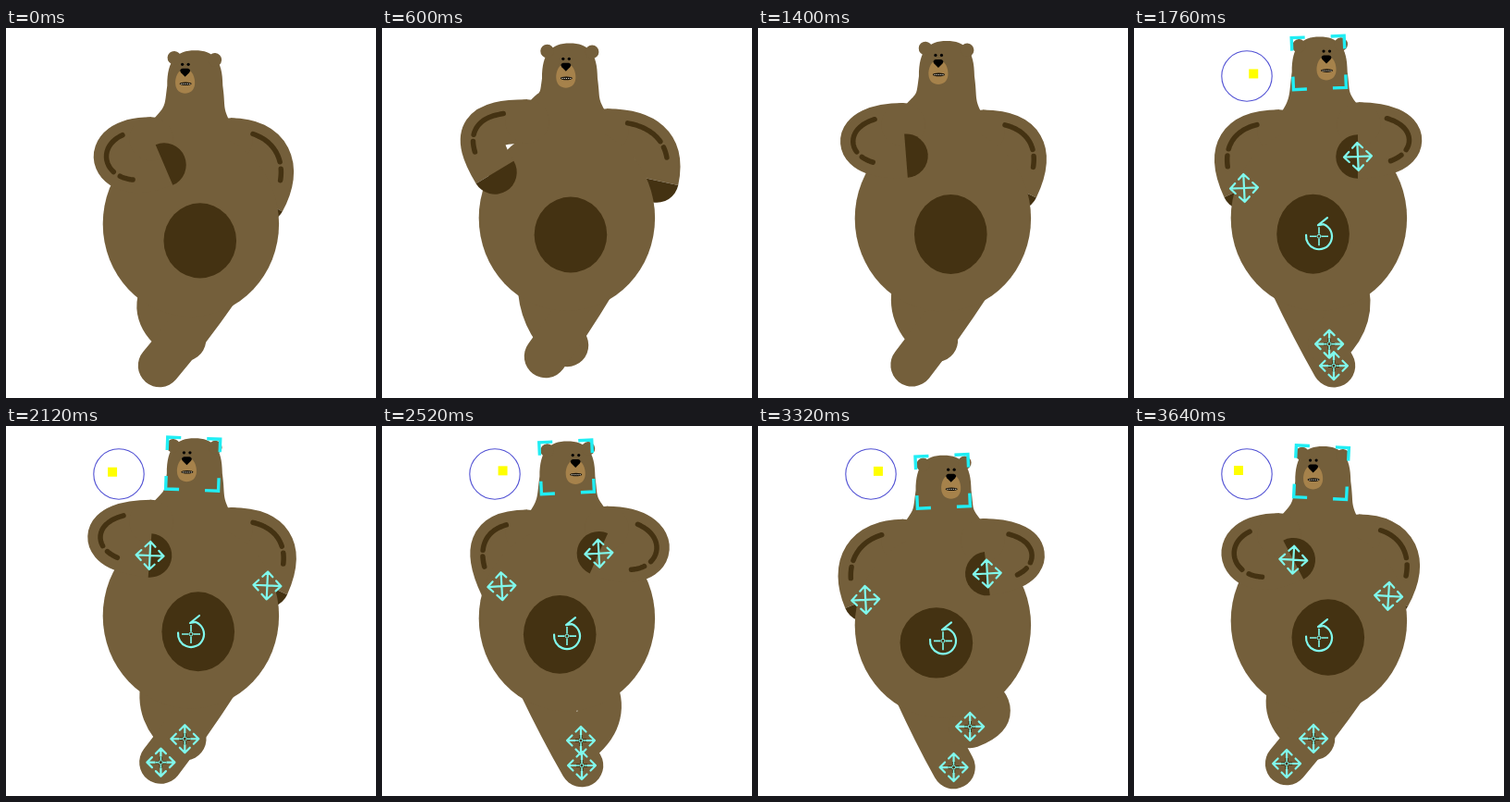
An HTML page with a canvas for the animation above (3.68 s loop, 400 by 400 pixels).

```html
<!DOCTYPE html>
<html lang="en">
<head>
<meta charset="utf-8">
<title>Strutting bear</title>
<style>
  html, body { margin: 0; width: 100%; height: 100%; overflow: hidden; background: #fff; }
  canvas { display: block; width: 400px; height: 400px; }
</style>
</head>
<body>
<canvas id="stage" width="400" height="400"></canvas>
<script>
const ctx = document.getElementById('stage').getContext('2d');
const LOOP = 3680, STEP = 40, CYCLE = 730, RIG_START = 1720;
const FUR = '#745f3b', DARK = '#443212', MUZZLE = '#a6824b';
const RIG = '#80f8ec', FRAME = '#20eef4';
const TAU = Math.PI * 2, LIMB = 47.5, SHOULDER_X = 157, WIDTH = 400;

// phase, hand x, hand y, hand angle, shoulder y, bend length
const ARM = [
  [0, 171, 148, -23, 120, 62],
  [120, 104, 182, 80, 128, 38],
  [235, 103, 165, 78, 111, 40],
  [300, 119, 173, 65, 112, 44],
  [335, 130, 174, 64, 115, 42],
  [365, 122, 187, 61, 121, 42],
  [485, 107, 182, 81, 128, 38],
  [600, 122, 156, 59, 101, 50],
  [665, 158, 139, 0, 104, 60],
  [697, 166, 138, -25, 111, 67]
];
// phase, foot x, foot y
const LEFT_FOOT = [
  [0, 193, 337], [120, 163, 313], [235, 208, 355], [330, 216, 367],
  [485, 204, 366], [600, 200, 343], [665, 193, 338]
];
const RIGHT_FOOT = [
  [0, 166, 365], [120, 189, 365], [235, 203, 343], [330, 215, 340],
  [485, 236, 313], [600, 177, 355], [665, 167, 364]
];

const wrap = (v, n) => ((v % n) + n) % n;

// Periodic cubic interpolation through a list of keys
function sample(keys, phase) {
  const n = keys.length;
  const p = wrap(phase, CYCLE);
  let i = n - 1;
  while (keys[i][0] > p) i--;
  const at = k => ({ v: keys[wrap(k, n)], t: keys[wrap(k, n)][0] + Math.floor(k / n) * CYCLE });
  const [a, b, c, d] = [at(i - 1), at(i), at(i + 1), at(i + 2)];
  const span = c.t - b.t, u = (p - b.t) / span, u2 = u * u, u3 = u2 * u;
  return b.v.slice(1).map((_, j) => {
    const k = j + 1;
    const m0 = (c.v[k] - a.v[k]) / (c.t - a.t) * span;
    const m1 = (d.v[k] - b.v[k]) / (d.t - b.t) * span;
    return (2 * u3 - 3 * u2 + 1) * b.v[k] + (u3 - 2 * u2 + u) * m0 +
           (3 * u2 - 2 * u3) * c.v[k] + (u3 - u2) * m1;
  });
}

// Two bounces per stride; -1 at the top of the bounce
const bounce = (phase, top) => -Math.cos(TAU * (phase - top) / (CYCLE / 2));

function local(x, y, angle, draw) {
  ctx.save();
  ctx.translate(x, y);
  ctx.rotate(angle);
  draw();
  ctx.restore();
}

function mirrored(flip, draw) {
  ctx.save();
  if (flip) {
    ctx.translate(WIDTH, 0);
    ctx.scale(-1, 1);
  }
  draw();
  ctx.restore();
}

function ellipse(x, y, rx, ry, color) {
  ctx.fillStyle = color;
  ctx.beginPath();
  ctx.ellipse(x, y, rx, ry, 0, 0, TAU);
  ctx.fill();
}

function stroke(color, width, cap = 'round') {
  ctx.strokeStyle = color;
  ctx.lineWidth = width;
  ctx.lineCap = cap;
  ctx.lineJoin = cap === 'round' ? 'round' : 'miter';
  ctx.stroke();
}

function polyline(...points) {
  points.forEach(([x, y], i) => i ? ctx.lineTo(x, y) : ctx.moveTo(x, y));
}

function armPose(phase) {
  const [x, y, degrees, shoulder, bend] = sample(ARM, phase);
  const angle = degrees * Math.PI / 180;
  const p = wrap(phase, CYCLE);
  return {
    x, y, angle, shoulder,
    front: p < 180 || p > 540,
    curve: [[SHOULDER_X, shoulder], [SHOULDER_X - bend, shoulder],
            [x - bend * Math.cos(angle), y - bend * Math.sin(angle)], [x, y]]
  };
}

// Point beside a cubic, at a signed distance
function offsetPoint(curve, t, distance) {
  const s = 1 - t;
  const [a, b, c, d] = curve;
  const pos = k => s * s * s * a[k] + 3 * s * s * t * b[k] + 3 * s * t * t * c[k] + t * t * t * d[k];
  const vel = k => s * s * (b[k] - a[k]) + 2 * s * t * (c[k] - b[k]) + t * t * (d[k] - c[k]);
  const vx = vel(0), vy = vel(1), len = Math.hypot(vx, vy) || 1;
  return [pos(0) + vy / len * distance, pos(1) - vx / len * distance];
}

function drawArm(arm) {
  const [a, b, c, d] = arm.curve;
  ctx.beginPath();
  ctx.moveTo(...a);
  ctx.bezierCurveTo(...b, ...c, ...d);
  stroke(FUR, LIMB, 'butt');
  ellipse(a[0], a[1], LIMB / 2, LIMB / 2, FUR);
  local(arm.x, arm.y, arm.angle, () => {
    ctx.fillStyle = DARK;
    ctx.beginPath();
    ctx.arc(0, 0, LIMB / 2, -Math.PI / 2, Math.PI / 2);
    ctx.fill();
  });
}

function drawArmShine({ curve }) {
  for (const [from, to] of [[0.19, 0.59], [0.66, 0.77]]) {
    const points = [];
    for (let i = 0; i <= 16; i++) {
      points.push(offsetPoint(curve, from + (to - from) * i / 16, -10));
    }
    ctx.beginPath();
    polyline(...points);
    stroke(DARK, 5.5);
  }
}

function drawLeg(hipX, hipY, [x, y], side) {
  const slack = Math.max(0, 88 - Math.hypot(x - hipX, y - hipY));
  const bulge = Math.min(41, slack);
  ctx.beginPath();
  ctx.moveTo(hipX, hipY);
  ctx.quadraticCurveTo((hipX + x) / 2 + side * bulge, (hipY + y) / 2 + 4, x, y);
  ctx.fillStyle = FUR;
  ctx.fill();
  stroke(FUR, LIMB - 1);
}

function drawHead({ x, top, tilt, swing }, leftY, rightY) {
  const l = leftY - 22, r = rightY - 22;
  ctx.fillStyle = FUR;
  ctx.beginPath();
  ctx.moveTo(160, l);
  ctx.bezierCurveTo(x - 31, l - 14, x - 33, top + 60, x - 30, top + 38);
  ctx.bezierCurveTo(x - 30, top + 10, x - 20, top, x, top);
  ctx.bezierCurveTo(x + 20, top, x + 30, top + 10, x + 30, top + 38);
  ctx.bezierCurveTo(x + 33, top + 60, x + 30, r - 14, 241, r);
  ctx.lineTo(241, 165);
  ctx.lineTo(160, 165);
  ctx.fill();

  const ear = 25.5 - 3.5 * Math.abs(swing);
  local(x, top, tilt, () => {
    ellipse(-ear, 9, 7.3, 7.3, FUR);
    ellipse(ear, 9, 7.3, 7.3, FUR);
  });
}

function drawFace({ x, top, swing }) {
  const drop = 3 * (1 - Math.abs(swing));
  local(x - 0.7 - 10 * swing, top + drop, 0, () => {
    ctx.fillStyle = MUZZLE;
    ctx.beginPath();
    ctx.moveTo(0, 20);
    ctx.bezierCurveTo(8, 20, 11, 30, 10.5, 36);
    ctx.bezierCurveTo(10, 50, -10, 50, -10.5, 36);
    ctx.bezierCurveTo(-11, 30, -8, 20, 0, 20);
    ctx.fill();

    ellipse(-3, 15, 1.6, 1.6, '#000');
    ellipse(3.5, 15, 1.6, 1.6, '#000');

    ctx.fillStyle = '#000';
    ctx.beginPath();
    ctx.moveTo(-3, 19.5);
    ctx.lineTo(3, 19.5);
    ctx.quadraticCurveTo(7, 21, 4.5, 24);
    ctx.lineTo(0, 28.5);
    ctx.lineTo(-4.5, 24);
    ctx.quadraticCurveTo(-7, 21, -3, 19.5);
    ctx.fill();

    ellipse(0.5, 36, 6.5, 1.8, '#17120a');
    ctx.beginPath();
    for (let i = -2; i <= 2; i++) polyline([i * 2.2, 36], [i * 2.2 + 1.2, 36.2]);
    stroke('#e8e2d2', 1, 'butt');
  });
}

function drawMover(x, y, angle, pivot) {
  local(x, y, angle, () => {
    ctx.beginPath();
    for (let i = 0; i < 4; i++) {
      polyline([0, 0], [0, -15]);
      polyline([-5.5, -9.5], [0, -15], [5.5, -9.5]);
      ctx.rotate(Math.PI / 2);
    }
    stroke(RIG, 2.2);
    if (pivot) drawPivot(6);
  });
}

function drawPivot(size) {
  ctx.beginPath();
  polyline([-size, 0], [size, 0]);
  polyline([0, -size], [0, size]);
  stroke(DARK, 3.4, 'butt');
  stroke(RIG, 1.6, 'butt');
  ellipse(0, 0, 2.6, 2.6, DARK);
  ctx.beginPath();
  ctx.arc(0, 0, 2, 0, TAU);
  stroke(RIG, 1);
}

function drawSpinner(x, y) {
  local(x, y, 0, () => {
    ctx.beginPath();
    ctx.moveTo(9, -20);
    ctx.lineTo(-1, -12);
    ctx.arc(0, 0, 14, -1.2, Math.PI + 0.1);
    stroke(RIG, 2.2);
    drawPivot(10);
  });
}

function drawBrackets({ top, tilt, swing }) {
  local(201 + 1.5 * swing, top + 28, tilt, () => {
    ctx.beginPath();
    for (const sx of [-1, 1]) {
      for (const sy of [-1, 1]) {
        polyline([sx * 14, sy * 28], [sx * 28.5, sy * 28], [sx * 28.5, sy * 14]);
      }
    }
    stroke(FRAME, 3.4, 'butt');
  });
}

function drawRig(head, arms, feet, phase) {
  const { swing } = head;
  ctx.beginPath();
  ctx.arc(122, 52, 27.2, 0, TAU);
  stroke('#5252d4', 1.1);
  ctx.fillStyle = '#ff0';
  ctx.fillRect(117 - 9 * swing, 50.5 - 7.5 * Math.abs(swing), 10, 10);

  drawBrackets(head);
  arms.forEach((arm, i) => drawMover(i ? WIDTH - arm.x : arm.x, arm.y, 0.06 * swing));
  drawSpinner(200, 229 + 4.7 * bounce(phase, 628));
  for (const [x, y] of feet) drawMover(x, y, 0, true);
}

function draw(time) {
  const phase = time % CYCLE;
  const turn = TAU * (phase - 722) / CYCLE;
  const swing = 0.9 * Math.cos(turn) + 0.1 * Math.cos(3 * turn);
  const leap = 7 * Math.exp(-(((phase - 268) / 30) ** 2) / 2);
  const head = {
    swing,
    x: 202.3 + 2 * swing,
    top: 25.7 + 13 * bounce(phase, 645) - leap,
    tilt: 0.05 * swing
  };
  const torsoY = 211 + 6.5 * bounce(phase, 632);
  const arms = [armPose(phase), armPose(phase + CYCLE / 2)];
  const feet = [sample(LEFT_FOOT, phase), sample(RIGHT_FOOT, phase)];
  const drawArms = front => arms.forEach((arm, i) => {
    if (arm.front === front) mirrored(i, () => drawArm(arm));
  });

  ctx.fillStyle = '#fff';
  ctx.fillRect(0, 0, 400, 400);

  drawArms(false);
  drawLeg(170, torsoY + 71, feet[0], -1);
  drawLeg(229, torsoY + 71, feet[1], 1);
  ellipse(199.9, torsoY, 95.2, 100.5, FUR);
  drawHead(head, arms[0].shoulder, arms[1].shoulder);
  ellipse(200.8 + 9 * swing, 229.8 + 8 * bounce(phase, 638),
          39.3, 39 - 4 * bounce(phase, 662), DARK);
  drawArms(true);
  arms.forEach((arm, i) => mirrored(i, () => drawArmShine(arm)));
  drawFace(head);

  if (time >= RIG_START) drawRig(head, arms, feet, phase);
}

const start = performance.now();
function tick() {
  const time = (performance.now() - start) % LOOP;
  draw(Math.floor(time / STEP) * STEP);
  requestAnimationFrame(tick);
}
tick();
</script>
</body>
</html>
```
